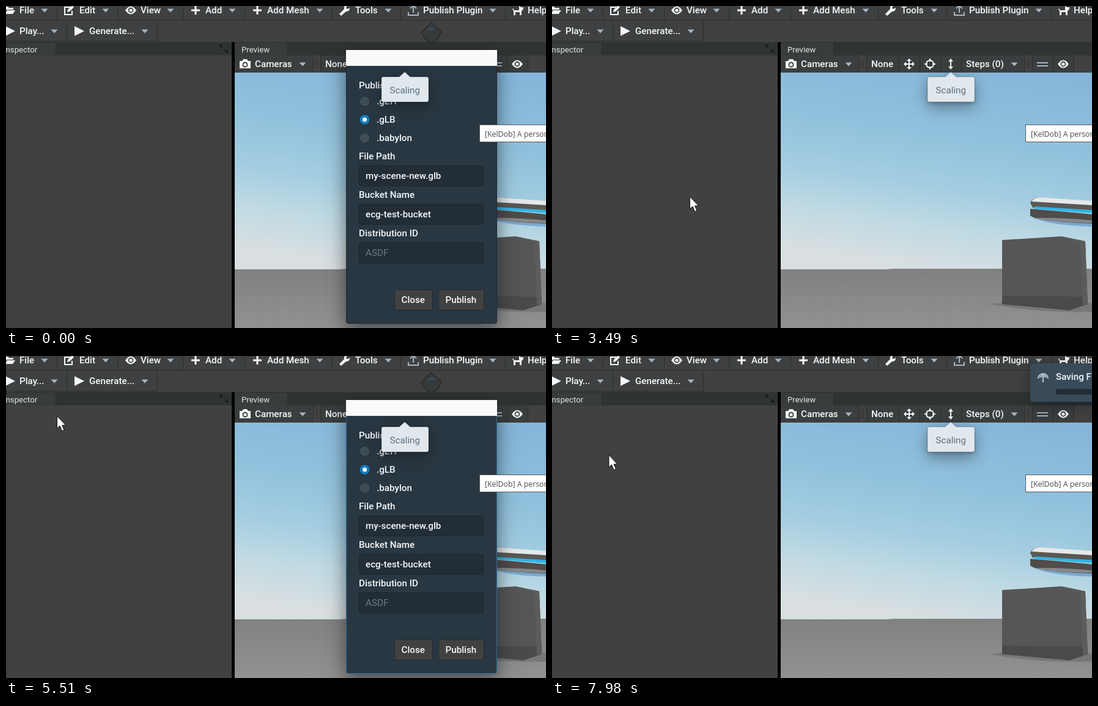
Animation of 883 by 527 pixels, one loop 8 s. Source, as an HTML page:

```html
<!DOCTYPE html>
<html lang="en">
<head>
<meta charset="utf-8">
<title>Scene editor</title>
<style>
html, body { margin: 0; width: 883px; height: 527px; overflow: hidden; background: #414141; }
svg { display: block; }
text { font: 500 15.2px Roboto, sans-serif; fill: #f5f8fa; white-space: pre; }
.tab { font-size: 13.2px; font-weight: 400; fill: #e4e6e7; }
.hint { font-weight: 400; fill: #5c7080; }
.native { font: 400 12.3px "Open Sans", sans-serif; fill: #484850; }
.dim { font-weight: 400; fill: #717981; }
.icon { fill: #f5f8fa; }
.line { fill: none; stroke: #f5f8fa; stroke-width: 2; }
.grey { fill: none; stroke: #a7b6c2; stroke-width: 2; }
.caret { fill: #a7b6c2; }
.rule { stroke: #2b2e2f; }
.float { filter: drop-shadow(0 2px 2px rgba(16,22,26,.25)) drop-shadow(0 8px 12px rgba(16,22,26,.42)); }
.deep { filter: drop-shadow(0 8px 12px rgba(16,22,26,.42)) drop-shadow(0 14px 20px rgba(16,22,26,.22)); }
</style>
</head>
<body>
<svg id="stage" width="883" height="527" viewBox="0 0 883 527"></svg>
<script>
const stage = document.getElementById('stage');

// Markup helpers
const text = (x, y, s, cls = '') => `<text x="${x}" y="${y}" class="${cls}">${s}</text>`;
const path = (d, attrs = 'class="icon"') => `<path d="${d}" ${attrs}/>`;
const rect = (x, y, w, h, fill, attrs = '') =>
  `<rect x="${x}" y="${y}" width="${w}" height="${h}" fill="${fill}" ${attrs}/>`;
const line = d => path(d, 'class="line"');
const grey = d => path(d, 'class="grey"');
const caret = (x, y) => path(`M${x - 5.5} ${y - 2.5}h11l-5.5 6z`, 'class="caret"');
const rules = (xs, y, h) => path(xs.map(x => `M${x + .5} ${y}v${h}`).join(''), 'class="rule"');
const at = (x, y, s) => `<g transform="translate(${x} ${y})">${s}</g>`;
const gradient = (id, stops) =>
  `<linearGradient id="${id}" gradientUnits="userSpaceOnUse" x1="700" y1="100" x2="650" y2="435">` +
  stops.map(([o, c]) => `<stop offset="${o}" stop-color="${c}"/>`).join('') + '</linearGradient>';

// Icons, centred on 0,0
const plus = path('M-7 0H7M0-7V7', 'class="line" style="stroke-width:3"');
const play = path('M-7-8L9 0L-7 8z');
const eye = path('M-9 0Q0-13 9 0Q0 13-9 0z') +
  '<circle r="4.4" fill="#3d3f40"/><circle r="2.6" class="icon"/>';
const folder = path('M-9 5V-6h6l2 2h7v3H-5zM-8 6l4-6H9L5 6z');
const edit = line('M2-5H-7V7H5V1') + path('M-3 3l1-4 7-7 3 3-7 7z');
const wrench = path('M-8 6L0-2Q-1-8 5-8L3-4 5-2 9-4Q9 2 3 2L-5 9z');
const upload = grey('M-8 3v5H8V3M0 4V-7M-5-3L0-8 5-3');
const dog = path('M-8-3l2 3H2V-7l3 2h4v3L6 1V8H3V3H-4V8h-3V1l-2-3z');
const camera = path('M-9-5h4l2-3h6l2 3h4V7H-9z') +
  '<circle cy="1" r="4.5" fill="#3d3f40"/><circle cy="1" r="2.6" class="icon"/>';
const move = line('M-6 0H6M0-6V6') + path('M-9 0l4-4v8zM9 0L5-4v8zM0-9l-4 4h8zM0 9l-4-4h8z');
const target = '<circle r="6" class="line"/>' + line('M-9 0h5M9 0H4M0-9v5M0 9V4');
const updown = line('M0-6V6') + path('M0-9l-4 5h8zM0 9l-4-5h8z');

const menuBar = rect(0, 0, 883, 59, '#414141') + rect(0, 0, 883, 23, '#3e4041') +
  rect(0, 24, 247, 34, '#3e4041') +
  path('M0 23.5H883M0 57.5H247', 'class="rule"') +
  rules([83, 183, 289, 390, 533, 645, 816], 0, 23) + rules([99, 247], 24, 34) +
  [['File', 22, 63], ['Edit', 120, 163], ['View', 220, 269], ['Add', 326, 370],
   ['Add Mesh', 427, 513], ['Tools', 571, 625], ['Publish Plugin', 682, 796]]
    .map(([s, x, c]) => text(x, 12, s) + caret(c, 7)).join('') + text(853, 12, 'Help') +
  at(6, 7, folder) + at(103, 7, edit) + at(204, 7, eye) + at(310, 7, plus) + at(411, 7, plus) +
  at(553, 7, wrench) + at(666, 7, upload) + at(837, 7, dog) +
  text(22, 46, 'Play...') + caret(79, 41) + at(6, 41, play) +
  text(136, 46, 'Generate...') + caret(227, 41) + at(119, 41, play);

const panels = rect(0, 59, 883, 22, '#303333') + rect(0, 59, 81, 22, '#393c3c') +
  rect(374, 59, 86, 22, '#393c3c') + rules([81, 460], 59, 22) +
  path('M0 59.5H81M374 59.5H460', 'class="rule"') +
  rect(0, 81, 369, 446, '#414141') + rect(374, 81, 509, 28, '#414141') +
  rect(369, 59, 5, 468, '#020202') + text(-4, 76, 'Inspector', 'tab') + text(385, 76, 'Preview', 'tab') +
  path('M350 68v-4h4M350 64l4 4M362 71v4h-4M362 75l-4-4', 'fill="none" stroke="#17191a" stroke-width="1.5"') +
  rect(374, 81, 128, 27, '#3b3e3f') + rect(515, 81, 257, 27, '#3b3e3f') + rect(786, 81, 67, 27, '#3b3e3f') +
  rules([502, 514, 567, 601, 635, 669, 772, 785, 819, 853], 81, 27) + rules([508, 779], 87, 15) +
  at(391, 95, camera) + text(407, 100, 'Cameras') + caret(485, 95) + text(522, 100, 'None') +
  at(584, 95, move) + at(618, 95, target) + at(652, 95, updown) +
  text(677, 100, 'Steps (0)') + caret(756, 95) + grey('M793 93h18M793 98h18') + at(836, 95, eye);

const scene = rect(374, 109, 509, 322, 'url(#day)', 'id="sky"') +
  path('M374 431L545 431 560 430 883 430V527H374z', 'fill="url(#ground)"') +
  path('M715 488Q800 479 883 486V500Q800 503 715 488z', 'fill="#777"') +
  path('M736 383L833 377 872 385 876 488 846 498 736 488z', 'fill="#565656"') +
  path('M736 474L876 476V488L846 498 736 488z', 'fill="#4a4a4a"') +
  path('M833 377L872 385 876 488 868 490 864 387z', 'fill="#5c5c5c"') +
  path('M784 345Q830 350 883 349V361Q810 359 784 345z', 'fill="#79a9d2"') +
  path('M782 332Q835 336 883 341V356Q795 353 782 343z', 'fill="#4f4c49"') +
  path('M790 347Q830 346 883 351V355Q820 354 790 347z', 'fill="#85888a"') +
  path('M782 322Q786 313 797 313L883 320V337L786 330z', 'fill="#5a5854"') +
  path('M784 320Q788 313 798 313L883 319V326L800 321z', 'fill="#e6e8ea"') +
  path('M788 328L883 334V339L788 332z', 'fill="#2fb5e6"');

const field = (y, label, value, cls) => text(577, y + 5, label) +
  rect(577.5, y + 15.5, 203, 33, '#222d36', 'rx="3" stroke="#1b252c"') + text(588, y + 37, value, cls);
const radio = (y, label, on) => text(606, y + 5, label) +
  `<circle cx="586.5" cy="${y}" r="8.5" fill="${on ? '#137cbd' : '#3f4d57'}" stroke="#1f2b34"/>` +
  (on ? `<circle cx="586.5" cy="${y}" r="3.5" fill="#fff"/>` : '');
const button = (x, w, label) =>
  rect(x + .5, 464.5, w, 33, '#414141', 'rx="3" stroke="#222b31"') + text(x + 11.5, 486, label);

const dialog = path('M695.5 27L712 43 707 52 695.5 62 684 52 679 43z',
    'fill="#383b3c" stroke="#26292a" stroke-width="1.5"') +
  path('M687 38l8.5-2 8.5 2z', 'fill="#27618c"') +
  rect(556.5, 72.5, 246, 447, '#293742', 'id="frame" class="deep" rx="3" stroke="#1d2a34"') +
  rect(556, 72, 247, 26, '#fbfafa') + text(577, 135, 'Publish') +
  radio(156, '.gLTF') + radio(186, '.gLB', true) + radio(216, '.babylon') +
  field(246, 'File Path', 'my-scene-new.glb') + field(309, 'Bucket Name', 'ecg-test-bucket') +
  field(372, 'Distribution ID', 'ASDF', 'dim') + button(635, 62, 'Close') + button(707, 74, 'Publish');

const bubble = 'M617 116H643L652 108 661 116H688Q691 116 691 119V154Q691 157 688 157H617Q614 157 614 154V119Q614 116 617 116z';
const tips = `<g class="float">${path(bubble, 'fill="#e1e8ed" stroke="#10161a" stroke-opacity=".2"')}</g>` +
  text(627.5, 142.5, 'Scaling', 'hint') +
  rect(774.5, 194.5, 120, 28, '#fff', 'stroke="#555"') + text(783, 214, '[KelDob] A personal', 'native');

const items = [
  [62, 'Open Workspace...', line('M-4-7H8V5H-4zM-4-4H-8V9H4V5')],
  [95, 'Reveal WorkSpace In Disk Stroller', grey('M-5-2V-8H3L7-4V8H1M-7 7Q-6 1 0 1M-3-2L1 1-3 5')],
  [141, 'Reload Project...', line('M-6-3A7 7 0 1 1-4 6M-7-9V-3H-1')],
  [174, 'Save Project...', path('M-3-9H4L8-5V5H-3zM-8-5H-5V7H4V9H-8z')],
  [208, 'Rename Project...', path('M-8 8l2-5L4-7l3 3L-3 6z', 'class="caret"')],
  [253, 'Add New Project...', plus],
  [287, 'Projects', path('M-9-2h4v4h-4zM-2-2h4v4h-4zM5-2h4v4h-4z', 'class="caret"')],
  [332, 'Open Velvet Sketch Desk...', rect(-8, -8, 16, 16, '#1f9ad6')]
];
const menu = path('M35 28L48 40H22z', 'fill="#2d4152"') +
  rect(-10, 40, 288, 315, '#414141', 'class="float" rx="3"') +
  rect(-10, 0, 281.5, 33, '#505356', 'id="hover" rx="2"') +
  path('M0 118.5H267M0 230.5H267M0 309.5H267', 'stroke="#5b5d5e"') +
  items.map(([y, s, icon]) => at(13, y - 1, icon) + text(30, y + 5, s)).join('') +
  path('M253 282l6 5-6 5z', 'class="caret"');

const toast = rect(782, 12, 120, 63, '#394b59', 'class="float" rx="3"') +
  path('M795 37A8 8 0 1 1 811 37M803 43V30M798 35l5-5 5 5', 'fill="none" stroke="#a7b6c2" stroke-width="2.5"') +
  text(824, 39, 'Saving Files...') + rect(824, 54, 90, 9, '#212d36', 'rx="4"');

const pointer = path('M0 0V20L4.6 16 8 24.5 11.5 23 8 15H14z', 'id="arrow" fill="#fff" stroke="#111"') +
  path('M-2 1Q0-1 2 1V8Q4 7 5 9 7 8 8 10 10 9 10 12V17L7 23H-2L-7 15Q-7 12-4 13L-2 15z',
    'id="hand" fill="#fff" stroke="#111"');

stage.innerHTML = '<defs>' +
  gradient('day', [[0, '#85b6d9'], [.35, '#91c1dc'], [.6, '#a3cde1'], [.8, '#c0dae3'], [1, '#d9dfe1']]) +
  gradient('dusk', [[0, '#aa9cc0'], [.4, '#bd9fbd'], [.7, '#d8b0be'], [1, '#eec3c5']]) +
  '<linearGradient id="ground" x2="0" y2="1"><stop stop-color="#818181"/><stop offset="1" stop-color="#919191"/></linearGradient></defs>' +
  menuBar + panels + scene +
  Object.entries({ dialog, tips, menu, toast, pointer }).map(([id, s]) => `<g id="${id}">${s}</g>`).join('');

const el = id => document.getElementById(id);
const clamp = v => Math.max(0, Math.min(1, v));
const ramp = (t, from, to) => clamp((t - from) / (to - from));
const show = (id, opacity) => {
  el(id).style.display = opacity > 0 ? '' : 'none';
  el(id).style.opacity = opacity;
};

// Pointer route: time, x, y
const route = [
  [1010, 712, 10], [1090, 727, 88], [1240, 863, 270], [1470, 728, 458], [1620, 728, 458],
  [1860, 646, 479], [2020, 646, 479], [2090, 568, 472], [2720, 288, 360], [2950, 288, 360],
  [3260, 220, 328], [3480, 231, 321], [3660, 99, 105], [4040, 726, 8], [4190, 726, 8],
  [4660, 755, 505], [4960, 564, 195], [5500, 84, 99], [5820, 38, 12], [6040, 38, 12],
  [6355, 33, 68], [6670, 60, 140], [7000, 125, 246], [7360, 93, 162]
];
function locate(t) {
  const i = route.findIndex(p => p[0] > t);
  if (i < 0) return route[route.length - 1].slice(1);
  const [a, b] = [route[Math.max(0, i - 1)], route[i]];
  const k = ramp(t, a[0], b[0]);
  return [a[1] + (b[1] - a[1]) * k, a[2] + (b[2] - a[2]) * k];
}

const STEP = 77.5; // the recording's frame interval
function draw(now) {
  const t = Math.floor((now % 8000 + 8) / STEP) * STEP;
  const [x, y] = locate(t);

  show('dialog', t < 3600 ? 1 - ramp(t, 2900, 3120) : ramp(t, 4120, 4350) - ramp(t, 5840, 6050));
  el('frame').setAttribute('stroke', t > 3600 ? '#2f6d99' : '#1d2a34');
  el('sky').setAttribute('fill', t > 4580 && t < 5240 ? 'url(#dusk)' : 'url(#day)');

  show('menu', ramp(t, 5900, 6120) - ramp(t, 7520, 7740));
  const row = items.find(([top]) => Math.abs(top - y) < 17);
  show('hover', row ? 1 : 0);
  if (row) el('hover').setAttribute('y', row[0] - 16.5);

  const slide = ramp(t, 7670, 7950);
  show('toast', slide);
  el('toast').setAttribute('transform', `translate(0 ${-75 * (1 - slide) ** 2})`);

  const inMenu = t > 6050 && t < 7550 && y > 40;
  show('pointer', t > 1000 ? 1 : 0);
  show('arrow', inMenu ? 0 : 1);
  show('hand', inMenu ? 1 : 0);
  el('pointer').setAttribute('transform', `translate(${x.toFixed(1)} ${y.toFixed(1)})`);
}

const start = performance.now();
function tick() {
  draw(performance.now() - start);
  requestAnimationFrame(tick);
}
tick();
</script>
</body>
</html>
```
